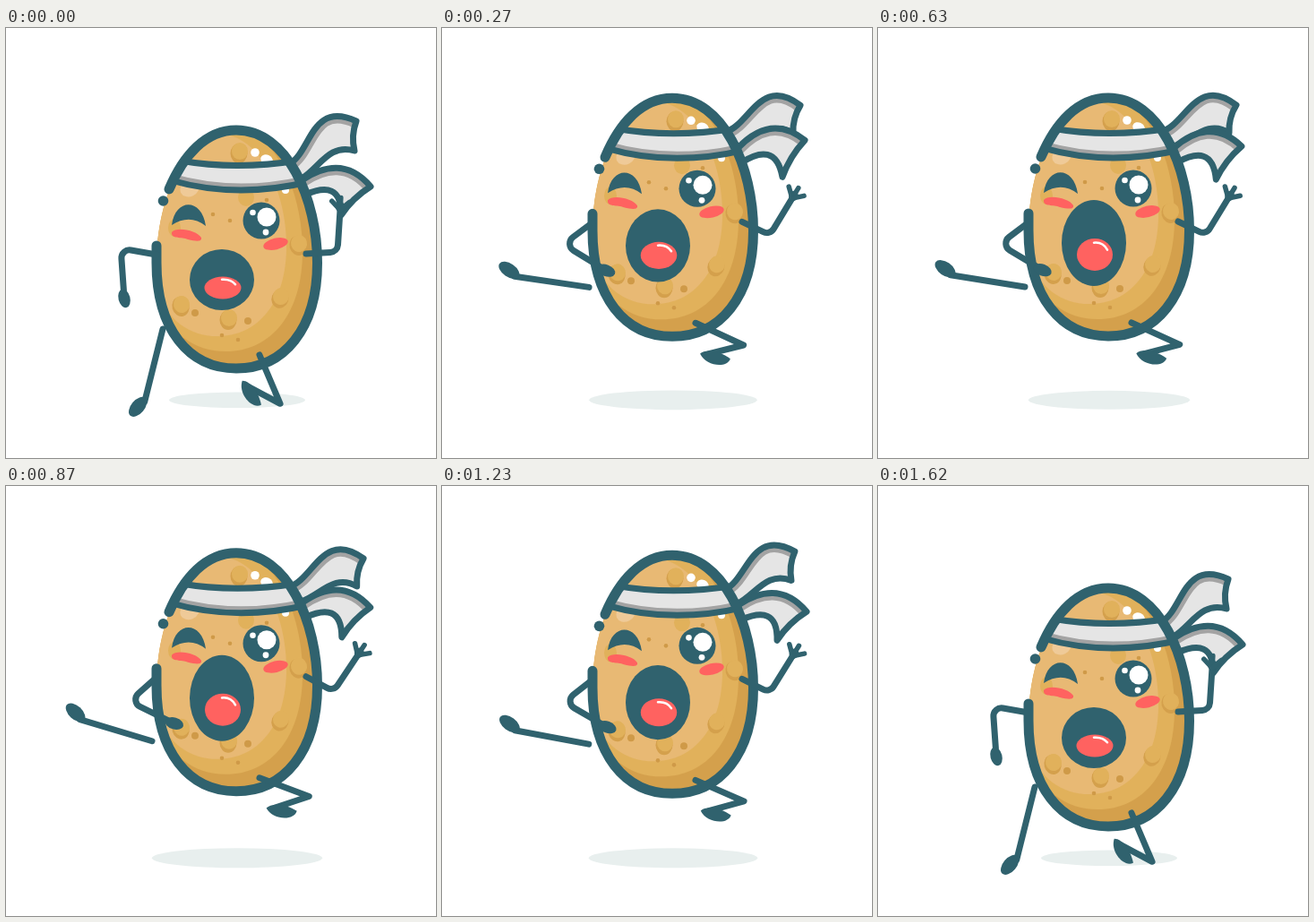
These frames come from a looping animation (480x480 px, 1650 ms). An HTML page with a canvas:

```html
<!DOCTYPE html>
<html lang="en">
<head>
<meta charset="utf-8">
<title>Jumping potato</title>
<style>
html, body { margin: 0; width: 100%; height: 100%; overflow: hidden; background: #fff; }
canvas { display: block; }
</style>
</head>
<body>
<canvas id="stage" width="480" height="480"></canvas>
<script>
const ctx = document.getElementById('stage').getContext('2d');
const LOOP = 1650, STEP = 30, JUMP_HEIGHT = 36;
const INK = '#30626e', RED = '#ff6260', LIGHT = '#e8b974', MID = '#e1b15b',
      DARK = '#d4a04c', SPOT = '#cf9a48', CLOTH = '#e5e5e5', FOLD = '#a3a3a3';
const LINE = 7;

const rad = deg => deg * Math.PI / 180;
const mix = (a, b, k) => a + (b - a) * k;
const mixPoint = (a, b, k) => a.map((v, i) => mix(v, b[i], k));
const polar = ([x, y], deg, len) => [x + len * Math.cos(rad(deg)), y + len * Math.sin(rad(deg))];

function ramp(t, from, to) {
  const s = Math.min(1, Math.max(0, (t - from) / (to - from)));
  return s * s * (3 - 2 * s);
}

// Rises from the loop start until `up`, then falls between `hold` and `down`.
const pulse = (t, up, hold, down) => ramp(t, 0, up) - ramp(t, hold, down);

// Point at a fraction of the way from a to b, pushed sideways.
function beside(a, b, part, push) {
  const dx = b[0] - a[0], dy = b[1] - a[1], len = Math.hypot(dx, dy);
  return [a[0] + dx * part + dy / len * push, a[1] + dy * part - dx / len * push];
}

function oval(x, y, rx, ry, color, turn = 0) {
  ctx.fillStyle = color;
  ctx.beginPath();
  ctx.ellipse(x, y, rx, ry, rad(turn), 0, 7);
  ctx.fill();
}

const dot = (x, y, r, color) => oval(x, y, r, r, color);

function stroke(path, width = LINE, color = INK) {
  ctx.lineWidth = width;
  ctx.strokeStyle = color;
  ctx.stroke(path);
}

function fill(path, color) {
  ctx.fillStyle = color;
  ctx.fill(path);
}

function clipped(shape, draw) {
  ctx.save();
  ctx.clip(shape);
  draw();
  ctx.restore();
}

function local([x, y], deg, draw) {
  ctx.save();
  ctx.translate(x, y);
  ctx.rotate(rad(deg));
  draw();
  ctx.restore();
}

function limb(a, b, c) {
  const path = new Path2D();
  path.moveTo(...a);
  path.arcTo(...b, ...c, 9);
  path.lineTo(...c);
  stroke(path);
}

const SIDES = 'C314 114 347.5 191 347.5 262 C347.5 336 310 380 257 380 C204 380 168 336 168 262';
const skin = new Path2D(`M257 114 ${SIDES} C168 191 200 114 257 114Z`);
const outline = new Path2D(`M182 180 C198 142 223 114 257 114 ${SIDES} L168 243`);
const bandTop = new Path2D('M194 148 Q257 159 326 148');
const bandBottom = new Path2D('M184 170 Q257 191 337 172');
const band = new Path2D('M194 148 Q257 159 326 148 L337 172 Q257 191 184 170Z');
const brow = new Path2D('M185 220 C189 189 219 190 223 221 Q205 207 185 220Z');
const wink = new Path2D('M185 228 C190 221 214 226 218 234 C219 239 212 238 203 236 C196 233 184 236 185 228Z');
const foot = new Path2D('M19 29 C22 21 38 17 52 20 C53 32 30 39 19 29Z');

function tail(root, tip, end, base, rise, tuck) {
  const curve = (a, b, [p, q]) => `C${[...beside(a, b, .32, p), ...beside(a, b, .66, q), ...b]}`;
  const edge = `M${root} ${curve(root, tip, rise)}`;
  const shape = new Path2D(`${edge} Q${[...beside(tip, end, .5, -5), ...end]} ${curve(end, base, tuck)}Z`);
  fill(shape, CLOTH);
  clipped(shape, () => stroke(new Path2D(edge), 16, FOLD));
  stroke(shape);
}

function tails(upper, lower) {
  tail([316, 152], mixPoint([391, 104], [400, 122], upper), mixPoint([389, 137], [392, 153], upper),
       [330, 168], [-2, 47], [-21, -1]);
  tail([330, 170], mixPoint([407, 177], [405, 161], lower), mixPoint([374, 209], [380, 202], lower),
       [334, 186], [20, 26], [-27, -21]);
}

function bump(x, y, turn = 0) {
  oval(x, y + 1, 9.5, 11, DARK, turn);
  oval(x + 1, y - 1.5, 9, 9.5, MID, turn);
}

// A smaller copy of the skin, set by its right and bottom edges.
function shade(scale, right, bottom, color) {
  ctx.save();
  ctx.translate(right, bottom);
  ctx.scale(scale, scale);
  ctx.translate(-347.5, -380);
  fill(skin, color);
  ctx.restore();
}

function body() {
  clipped(skin, () => {
    fill(skin, DARK);
    shade(.95, 331, 361, MID);
    shade(.85, 313, 344, LIGHT);
    oval(205, 179, 11, 9, '#efca98', -25);
    oval(268, 189, 9, 10, MID);
    oval(188, 223, 7, 10, MID);
    bump(260, 139);
    bump(195, 310, -15);
    bump(306, 301, 20);
    bump(248, 325);
    bump(326, 242, -15);
    for (const [x, y] of [[211, 318], [270, 327]]) dot(x, y, 4, SPOT);
    for (const [x, y] of [[241, 343], [259, 348], [231, 208], [250, 215], [291, 192]]) dot(x, y, 2.3, SPOT);
    dot(278, 139, 4.8, '#fff');
    oval(291, 147, 7, 5.5, '#fff', 25);
    dot(312, 181, 4, '#fff');
    fill(band, CLOTH);
    clipped(band, () => stroke(bandBottom, 15, FOLD));
    stroke(bandTop);
    stroke(bandBottom);
  });
  stroke(outline, 11);
  dot(175.5, 193, 5.8, INK);
}

function face(open) {
  fill(brow, INK);
  fill(wink, RED);
  oval(301, 241, 14, 6.3, RED, -13);
  dot(285, 215, 20.5, INK);
  dot(291, 211, 10.5, '#fff');
  dot(275.5, 206, 3.3, '#fff');
  dot(290, 228, 3.4, '#fff');

  const tongue = 12.5 + 5.5 * open, y = 290 - open;
  oval(241, 281 - 5 * open, 36, 34 + 14 * open, INK);
  oval(242, y, 20.5 - .5 * open, tongue, RED);
  stroke(new Path2D(`M241 ${y - tongue * .74} Q251 ${y - tongue * .8} 256 ${y - tongue * .3}`), 2.5, '#fff');
}

function leftLeg(k) {
  local(mixPoint([175, 336], [164, 325], k), mix(104, 189, k), () => {
    stroke(new Path2D('M0 0 L84 0'));
    oval(91, 6, 13, 7.5, INK, 26);
  });
}

function rightLeg(k) {
  local([283, 365], mix(67, 24.4, k), () => {
    stroke(new Path2D('M0 0 L59 0 L28 25'));
    fill(foot, INK);
  });
}

function leftArm(k) {
  const shoulder = [168, 253], bend = mix(86, 31, k);
  const elbow = polar(shoulder, mix(190, 143, k), 40.5);
  limb(shoulder, elbow, polar(elbow, bend, 47));
  oval(...polar(elbow, bend, 56), 10.5, 6.5, INK, bend - 10);
}

function rightArm(k) {
  const elbow = mixPoint([370, 250], [366, 267], k);
  const wrist = mixPoint([373, 203], [391, 226], k);
  limb([335, 252], elbow, wrist);
  const aim = Math.atan2(wrist[1] - elbow[1], wrist[0] - elbow[0]) * 180 / Math.PI;
  local(wrist, aim, () => {
    oval(3, 0, 6, 5, INK);
    for (const spread of [-47, 0, 47]) stroke(new Path2D(`M0 0 L${polar([0, 0], spread, 13.5)}`), 5.5);
  });
}

function draw(t) {
  const hold = pulse(t, 335, 1170, 1530);
  const dip = Math.exp(-(((t - 640) / 150) ** 2));
  const jump = hold * (1.1 - .1 * dip);
  const spread = hold * (1.05 - .3 * dip);

  ctx.fillStyle = '#fff';
  ctx.fillRect(0, 0, 480, 480);
  oval(258, 415.3, 76 + 18.7 * spread, 8.8 + 2.2 * spread, '#e8efee');

  ctx.save();
  ctx.translate(0, -JUMP_HEIGHT * jump);
  ctx.lineCap = ctx.lineJoin = 'round';
  leftLeg(jump);
  tails(pulse(t, 270, 700, 1550), pulse(t, 270, 270, 1050));
  body();
  face(pulse(t, 560, 850, LOOP));
  leftArm(jump);
  rightArm(jump);
  rightLeg(jump);
  ctx.restore();
}

const start = performance.now();
function tick() {
  const t = (performance.now() - start) % LOOP;
  draw(Math.floor(t / STEP) * STEP);
  requestAnimationFrame(tick);
}
tick();
</script>
</body>
</html>
```
